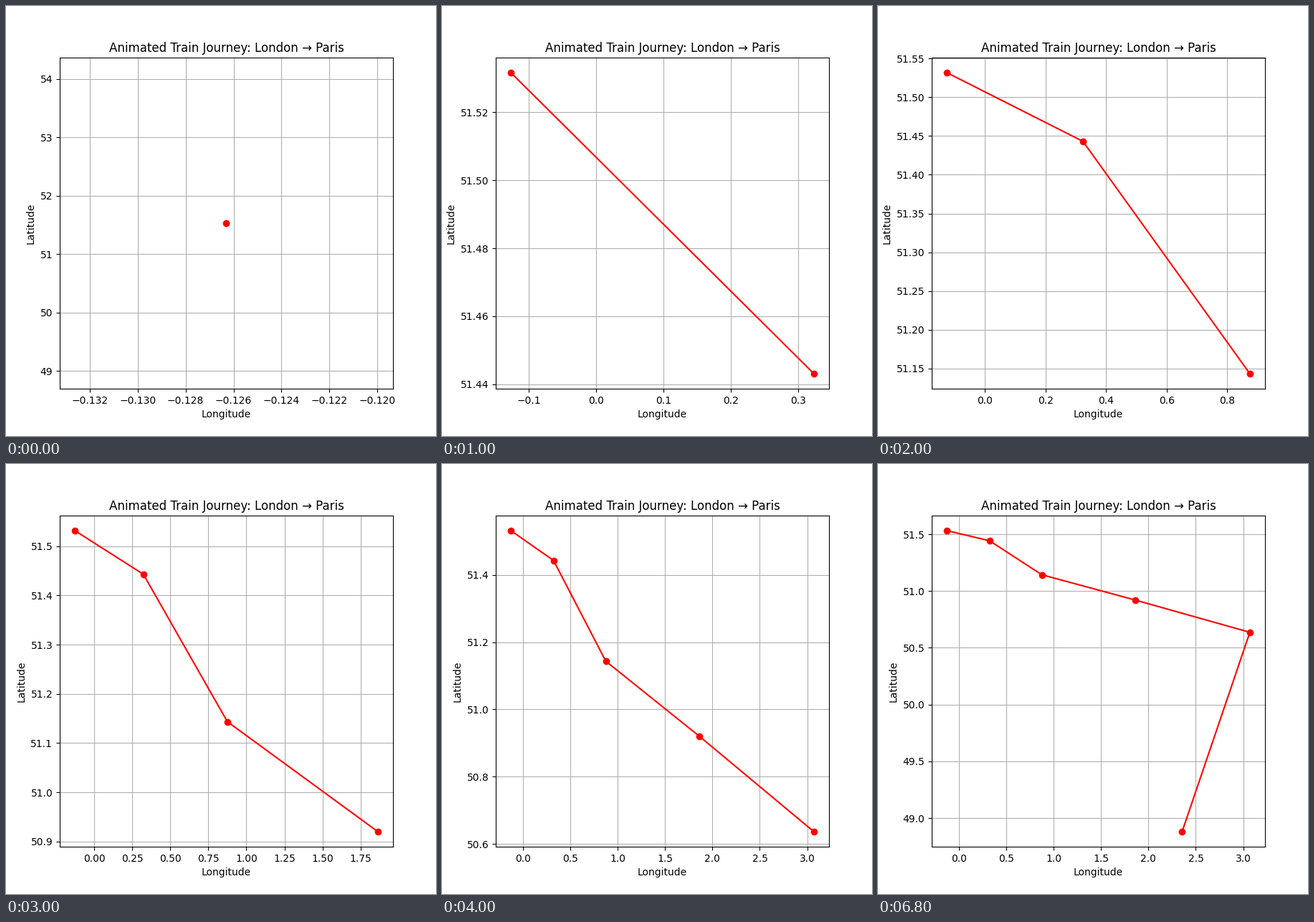
A matplotlib script that plays this animation: 600x600 px, repeating every 8 s.

```python
import matplotlib.pyplot as plt
from matplotlib.animation import FuncAnimation

# Stops along the route as (longitude, latitude)
STOPS = [
    (-0.1263, 51.5317),
    (0.3233, 51.4431),
    (0.8750, 51.1435),
    (1.8633, 50.9200),
    (3.0700, 50.6366),
    (2.3553, 48.8809),
]
HOLD = 2  # extra seconds on the finished route

fig, ax = plt.subplots(figsize=(6, 6), dpi=100)


def draw(step):
    """Draw the route up to the current stop, rescaling the axes to fit."""
    ax.clear()
    lons, lats = zip(*STOPS[:step + 1])
    ax.plot(lons, lats, "ro-")
    ax.set_title("Animated Train Journey: London → Paris")
    ax.set_xlabel("Longitude")
    ax.set_ylabel("Latitude")
    ax.grid(True)


anim = FuncAnimation(fig, draw, frames=len(STOPS) + HOLD, interval=1000,
                     init_func=lambda: draw(0), repeat=True, repeat_delay=0)

plt.show()
```
